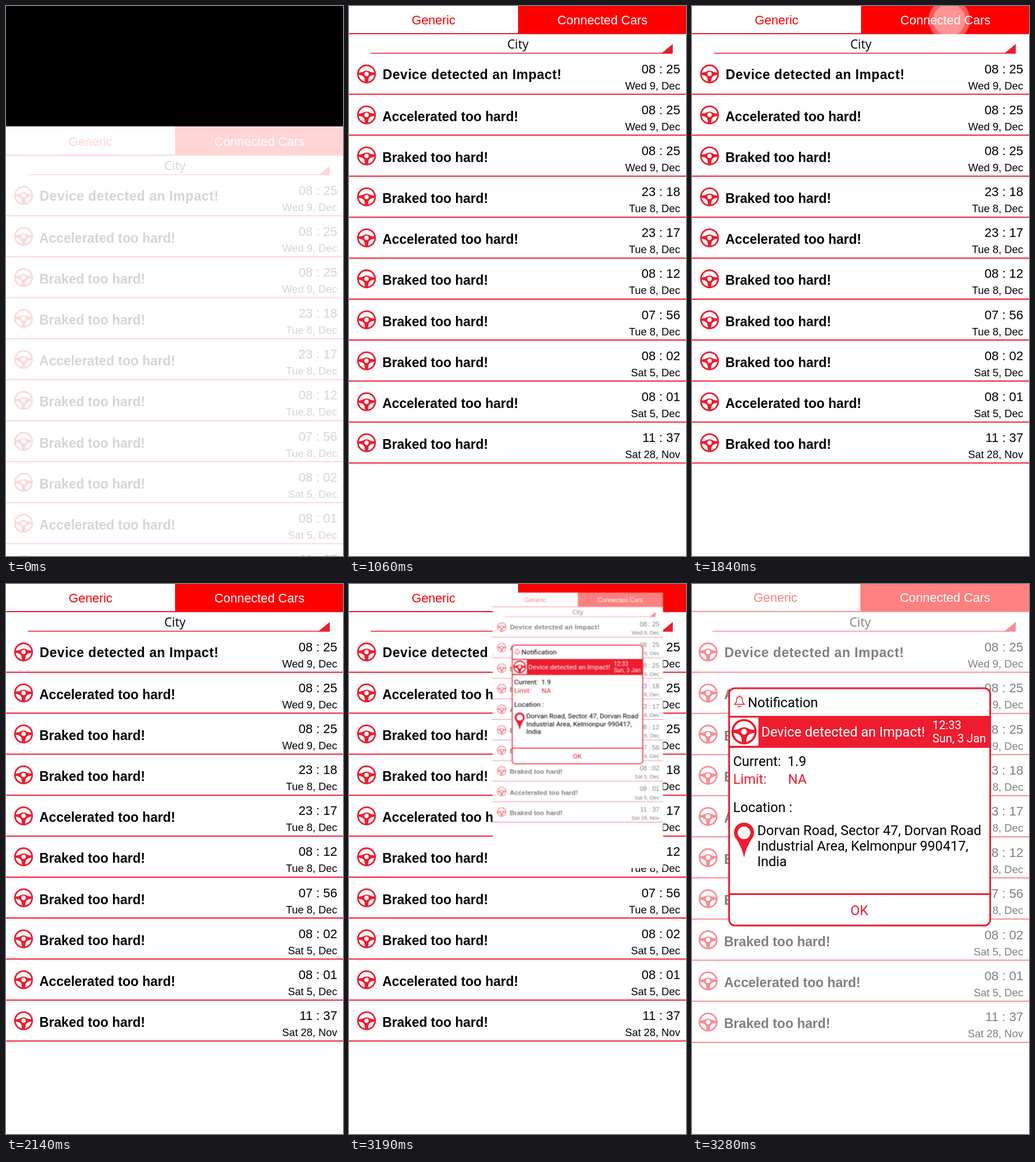
These frames come from a looping animation (586 px wide and 955 px high, 5.44 s). An HTML page:

```html
<!DOCTYPE html>
<html lang="en">
<head>
<meta charset="utf-8">
<title>Driving alerts</title>
<style>
  html, body { margin: 0; width: 100%; height: 100%; overflow: hidden; background: #fff; }
  svg { display: block; width: 586px; height: 955px; }
  text { white-space: pre; }
  .ui { font-family: "Liberation Sans", Arial, sans-serif; }
  .tab { font-size: 21.7px; text-anchor: middle; }
  .title { font-size: 23px; font-weight: 700; }
  .first { letter-spacing: .57px; }
  .time { font-size: 22px; text-anchor: end; }
  .date { font-size: 18.4px; text-anchor: end; }
  .city { font: 21.3px "Open Sans", "Noto Sans", sans-serif; text-anchor: middle; }
  .box { font: 23.6px Roboto, sans-serif; }
  .small { font-size: 20.3px; }
  .red { fill: #ee1c2e; }
  .line { stroke: #ee1c2e; fill: none; }
</style>
</head>
<body>
<svg viewBox="0 0 586 955">
  <defs>
    <g id="wheel">
      <circle r="15" class="line" stroke-width="2.8"/>
      <path class="red" d="M-15-2.5Q-8-2.5-5-4.5Q0-7 5-4.5Q8-2.5 15-2.5V1.5Q8 1.5 5 5Q3 7 2.8 14.5H-2.8Q-3 7-5 5Q-8 1.5-15 1.5Z"/>
      <circle r="3.8" fill="#fff"/>
    </g>
    <g id="list" class="ui">
      <path fill="#f00" d="M294-2H590V48H294Z"/>
      <path class="line" stroke-width="2" d="M-4 48H590"/>
      <text class="tab" x="147" y="31.7" fill="#f00">Generic</text>
      <text class="tab" x="440.7" y="31.7" fill="#fff">Connected Cars</text>
      <text class="city" x="293.7" y="74.3">City</text>
      <path class="line" stroke-width="1.5" d="M38 82H562"/>
      <path class="red" d="M543 82.5L563 66V82.5Z"/>
      <g id="rows"></g>
    </g>
  </defs>

  <rect width="586" height="955" fill="#fff"/>
  <g id="slide">
    <rect y="-400" width="586" height="398"/>
    <g id="fade"><use href="#list"/></g>
  </g>

  <g transform="translate(447.3 24)" fill="#fff">
    <g id="tap">
      <circle r="37.5" opacity=".36"/>
      <circle r="29" opacity=".34"/>
    </g>
  </g>

  <g id="popup">
    <rect x="-3" y="-1.5" width="592" height="957" fill="#fff"/>
    <g opacity=".5">
      <use href="#list" transform="translate(580 110) scale(1.0045 1.0035) translate(-580 -110)"/>
    </g>
    <g class="box">
      <rect x="64.5" y="181" width="454" height="412" rx="10" fill="#fff" stroke="#ee1c2e" stroke-width="3"/>
      <g class="line" stroke-width="1.4">
        <path d="M74 209Q77.5 206 77.5 201Q77.5 195.5 82.5 195.5Q87.5 195.5 87.5 201Q87.5 206 91 209Z"/>
        <path d="M79.5 211.5Q82.5 215 85.5 211.5M82.5 195.5V193"/>
      </g>
      <text x="97" y="213.5">Notification</text>
      <path class="red" d="M65 229H519V284.5H65Z"/>
      <path fill="#fff" d="M66 232H115.5V281H66Z"/>
      <use href="#wheel" transform="translate(90.5 256.5) scale(1.34)"/>
      <g fill="#fff">
        <text x="120.5" y="265">Device detected an Impact!</text>
        <text class="small" x="418" y="252">12:33</text>
        <text class="small" x="418" y="275">Sun, 3 Jan</text>
      </g>
      <text x="71.5" y="316">Current:</text>
      <text x="166" y="316">1.9</text>
      <text class="red" x="71.5" y="347">Limit:</text>
      <text class="red" x="167" y="347">NA</text>
      <text x="71.5" y="395.5">Location :</text>
      <path class="red" d="M90.5 475Q87 458 78 444A17.5 17.5 0 1 1 103 444Q94 458 90.5 475Z"/>
      <circle cx="90.5" cy="432" r="11" fill="#fff"/>
      <text x="113.5" y="435.5">Dorvan Road, Sector 47, Dorvan Road</text>
      <text x="113.5" y="462.5">Industrial Area, Kelmonpur 990417,</text>
      <text x="113.5" y="489.5">India</text>
      <path class="line" stroke-width="3" d="M65 538.5H519"/>
      <text class="red" x="291" y="575.3" text-anchor="middle">OK</text>
    </g>
  </g>
</svg>
<script>
const LOOP = 5440, STEP = 30;
const $ = id => document.getElementById(id);

const hard = 'Accelerated too hard!', brake = 'Braked too hard!';
const alerts = [
  ['Device detected an Impact!', '08 : 25', 'Wed 9, Dec'],
  [hard, '08 : 25', 'Wed 9, Dec'],
  [brake, '08 : 25', 'Wed 9, Dec'],
  [brake, '23 : 18', 'Tue 8, Dec'],
  [hard, '23 : 17', 'Tue 8, Dec'],
  [brake, '08 : 12', 'Tue 8, Dec'],
  [brake, '07 : 56', 'Tue 8, Dec'],
  [brake, '08 : 02', 'Sat 5, Dec'],
  [hard, '08 : 01', 'Sat 5, Dec'],
  [brake, '11 : 37', 'Sat 28, Nov']
];

$('rows').innerHTML = alerts.map(([title, time, date], i) => {
  const y = 153.2 + 71.15 * i;
  return `<use href="#wheel" x="30.5" y="${y - 35.2}"/>
    <text class="title ${i ? '' : 'first'}" x="${i ? 58 : 58.5}" y="${y - (i ? 24.5 : 26.5)}">${title}</text>
    <text class="time" x="576" y="${y - 36.5}">${time}</text>
    <text class="date" x="576" y="${y - 8.5}">${date}</text>
    <path class="line" stroke-width="2" d="M-4 ${y}H590"/>`;
}).join('');

// Holds each [time, style] pair until the next one.
function play(id, steps) {
  const frames = steps.map(([ms, style]) => ({ ...style, offset: ms / LOOP, easing: 'step-end' }));
  frames.push({ ...steps[steps.length - 1][1], offset: 1 });
  $(id).animate(frames, { duration: LOOP, iterations: Infinity });
}

// Samples a motion at the middle of each of its steps.
const sample = (start, count, pose) =>
  Array.from({ length: count }, (_, i) => [start + i * STEP, pose((i + .5) / count)]);

const move = (x, y, s = 1) => ({ transform: `translate(${x}px, ${y}px) scale(${s})` });

play('slide', [[0, move(0, 211)], [1000, move(0, 125)], [1030, move(0, 39)], [1060, move(0, 0)]]);
play('fade', [[0, 1 / 6], [1000, 1 / 2], [1030, 5 / 6], [1060, 1]].map(([ms, opacity]) => [ms, { opacity }]));

const hidden = { ...move(0, 0, 0), opacity: 0 };
const tapPose = p => ({
  ...move(0, 0, 1 - .65 * (1 - p) ** 5),
  opacity: Math.min(1, p / .15, (1 - p) / .5)
});
play('tap', [[0, hidden], ...sample(1630, 17, tapPose), [2140, hidden]]);

const zoom = s => ({ ...move(503 * (1 - s), 31.3 * (1 - s), s), opacity: 1 });
play('popup', [[0, hidden], ...sample(3130, 5, zoom), [3280, zoom(1)]]);
</script>
</body>
</html>
```
